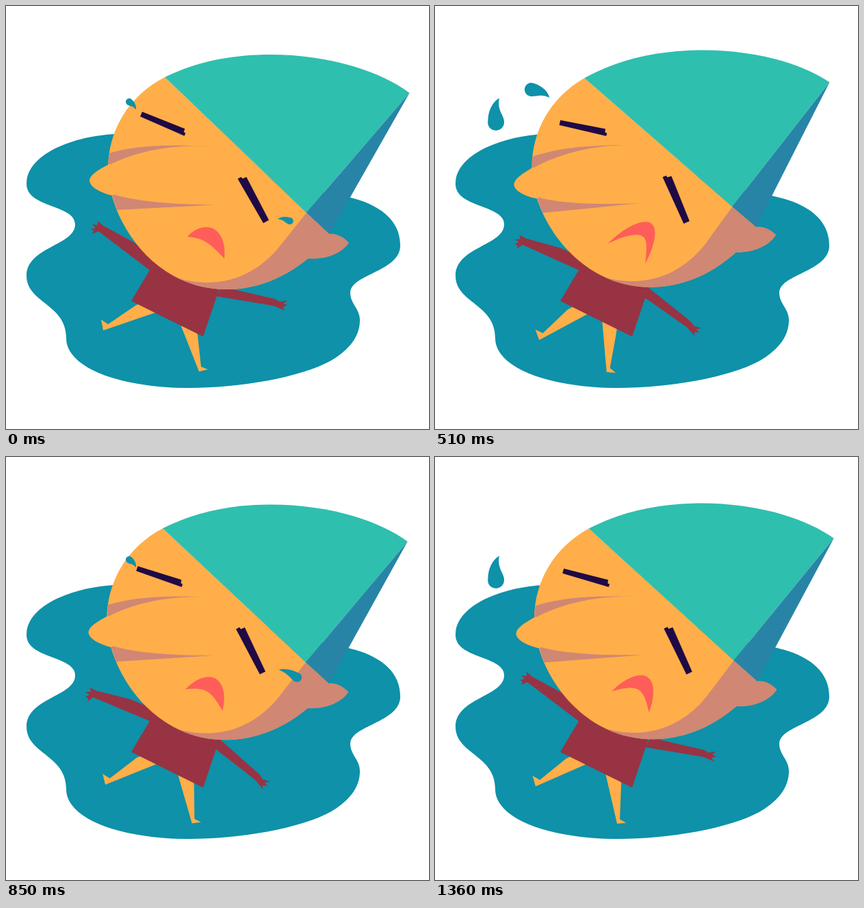
These frames come from a looping animation (618 by 618 pixels, 1.53 s). An HTML page:

```html
<!DOCTYPE html>
<html lang="en">
<head>
<meta charset="utf-8">
<title>Crying in a puddle</title>
<style>
  html, body { margin: 0; height: 100%; overflow: hidden; background: #fff; }
  svg { display: block; width: 100vw; height: 100vh; }
  .water { fill: #0e91a9; }
  .skin { fill: #ffae49; }
  .shade { fill: #d08774; }
  .shirt { fill: #983343; }
  .hat { fill: #2fbfae; }
  .fold { fill: #2884a6; }
  .eye { fill: #1f0a45; }
  .mouth { fill: #ff5d59; }
</style>
</head>
<body>
<svg viewBox="0 0 618 618">
  <path class="water" d="M200 185 L160 187 C97 190 30 217 30 260 C30 295 101 290 101 319 C101 350 30 352 30 394
    C30 434 88 435 88 485 C88 530 170 558 267 558 C340 558 430 543 475 518 C500 503 517 484 517 459
    C517 442 503 435 503 419 C503 392 576 388 576 350 C576 312 545 288 491 277 L440 268Z"/>

  <path id="legL" class="skin" d="M190 437 L149 465 L139 458 L142 474 L218 448 L225 425Z"/>
  <path id="legR" class="skin" d="M256 468 L282 534 L295 531 L285 527 L280 481 L275 445 L248 445Z"/>
  <path id="armL" class="shirt" d="M188 346 L142 321 L134 314 L134 320 L126 319 L131 324 L124 326 L128 328 L126 333 L135 329 L210 386 L230 378Z"/>
  <path id="armR" class="shirt" d="M315 410 L393 428 L400 432 L411 430 L405 435 L411 437 L404 440 L408 445 L391 438 L307 424Z"/>
  <path class="shirt" d="M183 431 L214 379 L260 378 L313 409 L288 483Z"/>

  <g id="head">
    <path class="skin" d="M232 104 C178 132 149 183 149 238 C149 308 212 414 322 414 C368 414 408 396 441 369 L472 333Z"/>
    <path class="shade" d="M439 302 L472 333 C482 332 493 337 501 346 C490 362 467 371 441 369 C408 396 368 414 322 414
      C293.4 414 268 406.8 247 395.6 C262 402 280 404 297 404 C340 403 375 382 400 351Z"/>
    <path class="shade" d="M151 215 C190 204 230 202 300 205 C240 202 190 212 149 233Z"/>
    <path class="shade" d="M154 274 C185 285 240 290 305 290.5 L162 298 C159 290 157 282 154 274Z"/>
    <path class="skin" d="M151 231 C135 239 122 247 122 255 C122 263 135 272 155 277 L200 250Z"/>
    <path class="hat" d="M232 104 L439 302 L589.5 127 C540 90 460 71 386 71 C325 71 275 83 232 104Z"/>
    <path class="fold" d="M589.5 127 L439 302 L472.5 333Z"/>
  </g>

  <path id="mouth" class="mouth"/>
  <path id="eyeL" class="eye" d="M0 -3.7 L67 -5 L67.5 0 L70.5 .5 V5 L0 3.7Z"/>
  <path id="eyeR" class="eye" d="M0 -3.7 L67 -5 L67.5 0 L70.5 .5 V5 L0 3.7Z"/>
  <path id="tears" class="water"/>
</svg>
<script>
// Time is counted in steps; sobs repeat twice per loop, the arms wave once.
const STEP = 170, LOOP = 9, SOB = LOOP / 2;
const $ = id => document.getElementById(id);
const mix = (a, b, k) => a + (b - a) * k;
const ease = k => (1 - Math.cos(Math.PI * k)) / 2;

// Rises to 1 at the peak, then falls back to 0 by the end of the sob.
const swing = (p, peak) => ease(p < peak ? p / peak : (SOB - p) / (SOB - peak));

// Arms slow down towards the top of their wave and are at rest by step 8.
const wave = t => 1 - Math.min(1, Math.abs(t - 5) / (t < 5 ? 5 : 3)) ** 2.5;

function turn(id, angle, x, y) {
  $(id).setAttribute("transform", `rotate(${angle} ${x} ${y})`);
}

function placeLid(id, x, y, angle, scale) {
  $(id).setAttribute("transform", `translate(${x} ${y}) rotate(${angle}) scale(${scale})`);
}

const mouthOpen = [265,337, 274,327, 284,323, 294,323, 312,324, 322,345, 319,369, 310,360, 303,352, 294,346, 285,340, 276,338, 265,337];
const mouthSad = [245,353, 270,330, 295,311, 317,311, 330,312, 331,330, 301,381, 308,358, 315,344, 312,335, 306,323, 272,336, 245,353];

function mouthPath(k) {
  const v = mouthOpen.map((a, i) => mix(a, mouthSad[i], k));
  return `M${v.slice(0, 2)}C${v.slice(2)}Z`;
}

// A bulb of radius r at (x, y) with a curved tail of length d; side mirrors it.
function tearPath(x, y, angle, d, r, side) {
  const a = angle * Math.PI / 180, c = Math.cos(a), s = Math.sin(a);
  const p = (u, v) => `${x + c * u - s * v * side} ${y + s * u + c * v * side} `;
  return "M" + p(d, 0) +
    "C" + p(.8 * d, -.8 * r) + p(.4 * d, -1.15 * r) + p(0, -r) +
    "C" + p(-.6 * r, -r) + p(-r, -.55 * r) + p(-r, 0) +
    "C" + p(-r, .6 * r) + p(-.5 * r, r) + p(0, r) +
    "C" + p(r, r) + p(.45 * d, -.1 * r) + p(d, 0) + "Z";
}

// Thrown off to the left: up, over and down while it grows.
function flyingTear(age, drop) {
  if (age < 0 || age > 3) return "";
  const r = 5 + 4.7 * age - .8 * age * age;
  const y = 140 + drop - 47 * age + 19 * age * age;
  return tearPath(180 - 30.3 * age, y, 49 - 14.6 * age * age, 3 * r, r, 1);
}

// Hangs by its tail from the right eye and swings down.
function hangingTear(age) {
  if (age > 2) return "";
  const angle = Math.min(90, 10 + 15 * age + 19 * age * age), a = angle * Math.PI / 180;
  const d = 18 + 22 * age, x = 397 + 6 * age * age;
  return tearPath(x + d * Math.cos(a), 311 + d * Math.sin(a), angle + 180, d, 5 + 3.5 * age, -1);
}

function draw(t) {
  const p = t % SOB, sob = swing(p, 2), kick = swing(p, 1.75), squeeze = sob ** .6;

  turn("head", -4.1 * sob, 250, 398);
  turn("armL", -14.5 * wave(t), 218, 371);
  turn("armR", 28.5 * wave(t), 311, 402);
  turn("legL", -16.5 * kick, 232, 419);
  turn("legR", 29 * kick, 263, 427);

  placeLid("eyeL", mix(197.5, 178, squeeze), mix(158, 174, squeeze), mix(22.7, 9, squeeze), "1");
  placeLid("eyeR", mix(380, 364, squeeze), mix(315, 316.5, squeeze), mix(-118.8, -111.5, squeeze), "1.06 -1.25");
  $("mouth").setAttribute("d", mouthPath(sob));
  $("tears").setAttribute("d",
    flyingTear(t, 0) + flyingTear(t - 1.7, 11) + flyingTear(t - 5, 10) + hangingTear(p));
}

let start, shown = 0;
function tick(now) {
  start ??= now;
  const t = Math.floor((now - start) / STEP) % LOOP;
  if (t !== shown) draw(shown = t);
  requestAnimationFrame(tick);
}
draw(0);
requestAnimationFrame(tick);
</script>
</body>
</html>
```
